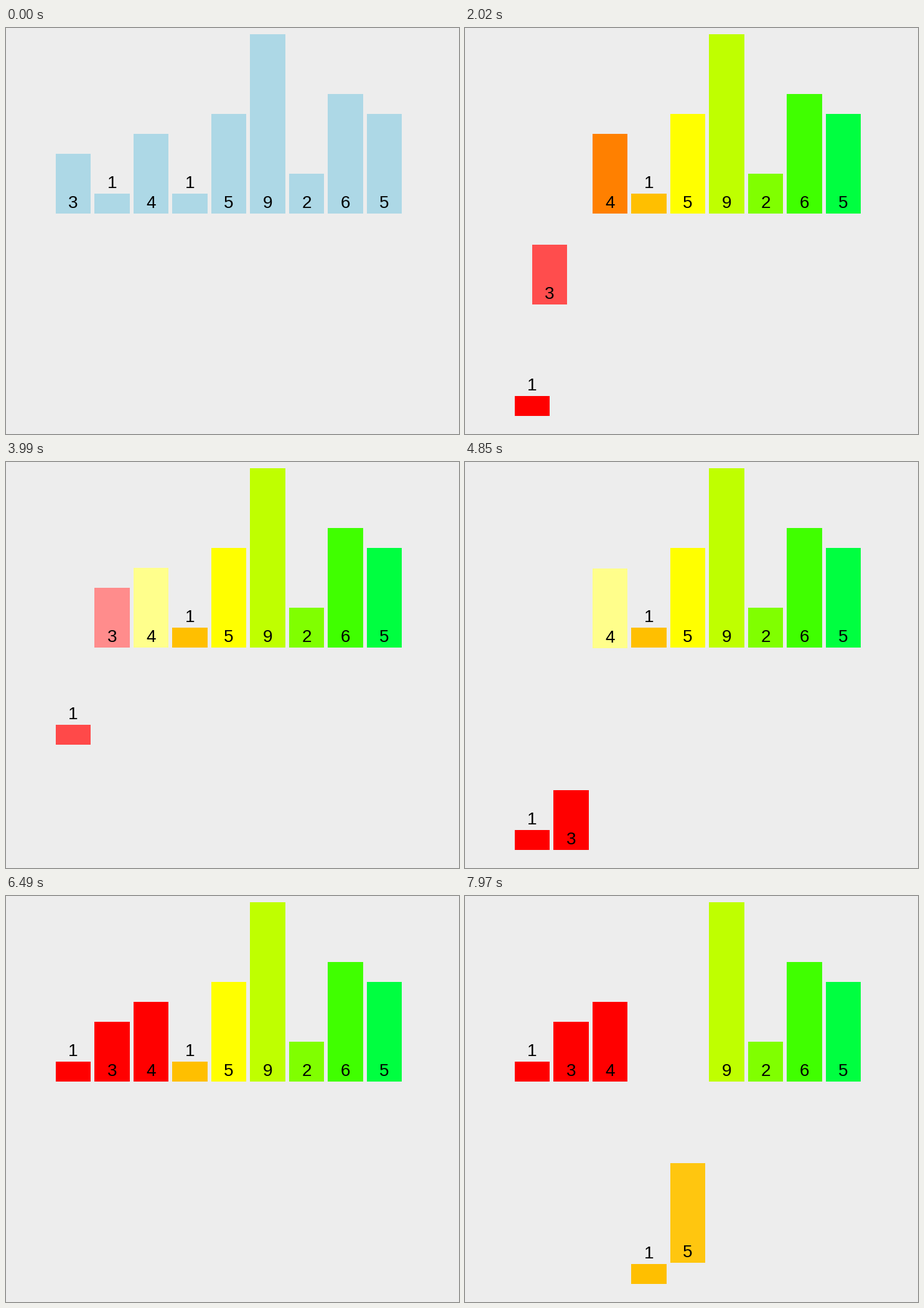
A matplotlib script that plays this animation: 728 px wide and 652 px high, repeating every 8000 ms.

```python
import matplotlib.pyplot as plt
import numpy as np
from matplotlib.animation import FuncAnimation
from matplotlib.patches import Rectangle

W, H, DPI = 728, 652, 100
LOOP, STEP, HOLD = 8000, 20, 30      # milliseconds

VALUES = [3, 1, 4, 1, 5, 9, 2, 6, 5]
LEFT, PITCH, BAR_W, UNIT = 79.8, 62.5, 56.25, 32
TOP_ROW, ROW_GAP = 298, 325
LABEL_LIFT = 9

BACKGROUND = "#ededed"
PLAIN = np.array([173, 216, 230])
RED = np.array([255, 0, 0])
AMBER = np.array([255, 191, 0])
ORANGE = np.array([255, 128, 0])
YELLOW = np.array([255, 255, 0])
HUES = [RED, np.array([255, 64, 0]), ORANGE, AMBER, YELLOW,
        np.array([191, 255, 0]), np.array([128, 255, 0]),
        np.array([64, 255, 0]), np.array([0, 255, 64])]


def pale(color):
    return np.minimum(color + 140, 255)


# Per bar: (start, end, slot, row, colour), in order of time.
tracks = [[(500, 650, i, 0, hue)] for i, hue in enumerate(HUES)]


def tint(bar, start, end, color):
    slot, row = tracks[bar][-1][2:4]
    tracks[bar].append((start, end, slot, row, color))


def move(bar, start, end, slot, row, color):
    tracks[bar].append((start, end, slot, row, color))


# Merge the first two bars.
tint(0, 1000, 1090, pale(RED))
tint(1, 1000, 1090, pale(HUES[1]))
move(1, 1450, 1670, 0, 1, RED)
move(0, 1930, 2140, 1, 1, RED)
move(1, 2410, 2650, 0, 0, RED)
move(0, 2900, 3140, 1, 0, RED)

# Merge that pair with the third bar.
tint(1, 3450, 3540, pale(RED))
tint(2, 3450, 3540, pale(ORANGE))
move(1, 3900, 4100, 0, 1, RED)
tint(0, 3900, 3990, pale(RED))
move(0, 4350, 4600, 1, 1, RED)
move(2, 4850, 5050, 2, 1, RED)
move(1, 5330, 5530, 0, 0, RED)
move(0, 5810, 6010, 1, 0, RED)
move(2, 6290, 6490, 2, 0, RED)

# Merge the fourth and fifth bars.
tint(3, 6850, 6910, pale(AMBER))
tint(4, 6850, 6910, pale(YELLOW))
move(3, 7250, 7540, 3, 1, AMBER)
move(4, 7820, 8017, 4, 1, AMBER)


def progress(t, start, end):
    if t >= end:
        return 1.0
    held = (t - start) // HOLD * HOLD
    u = min(1.0, 0.037 + held / (end - start))
    return u * u * (3 - 2 * u)


def state(bar, t):
    """Slot, row and colour of a bar at time t."""
    now = np.array([bar, 0, *PLAIN], float)
    for start, end, slot, row, color in tracks[bar]:
        if t < start:
            break
        goal = np.array([slot, row, *color], float)
        now = now + (goal - now) * progress(t, start, end)
    return now[0], now[1], now[2:] / 255


fig = plt.figure(figsize=(W / DPI, H / DPI), dpi=DPI, facecolor=BACKGROUND)
ax = fig.add_axes([0, 0, 1, 1])
ax.set_xlim(0, W)
ax.set_ylim(H, 0)
ax.axis("off")

bars, labels = [], []
for value in VALUES:
    bars.append(ax.add_patch(Rectangle((0, 0), BAR_W, value * UNIT, lw=0)))
    labels.append(ax.text(0, 0, str(value), family="Liberation Sans",
                          size=28 * 72 / DPI, color="black",
                          ha="center", va="baseline", zorder=3))


def draw(frame):
    t = frame * STEP + STEP / 2
    for i, value in enumerate(VALUES):
        slot, row, color = state(i, t)
        x = LEFT + slot * PITCH
        bottom = TOP_ROW + row * ROW_GAP
        bars[i].set_xy((x, bottom - value * UNIT))
        bars[i].set_facecolor(color)
        # A bar too short for its number carries it on top.
        base = bottom - UNIT if value == 1 else bottom
        labels[i].set_position((x + BAR_W / 2, base - LABEL_LIFT))
    return bars + labels


anim = FuncAnimation(fig, draw, frames=LOOP // STEP, interval=STEP,
                     repeat=True, repeat_delay=0, blit=False)
plt.show()
```
